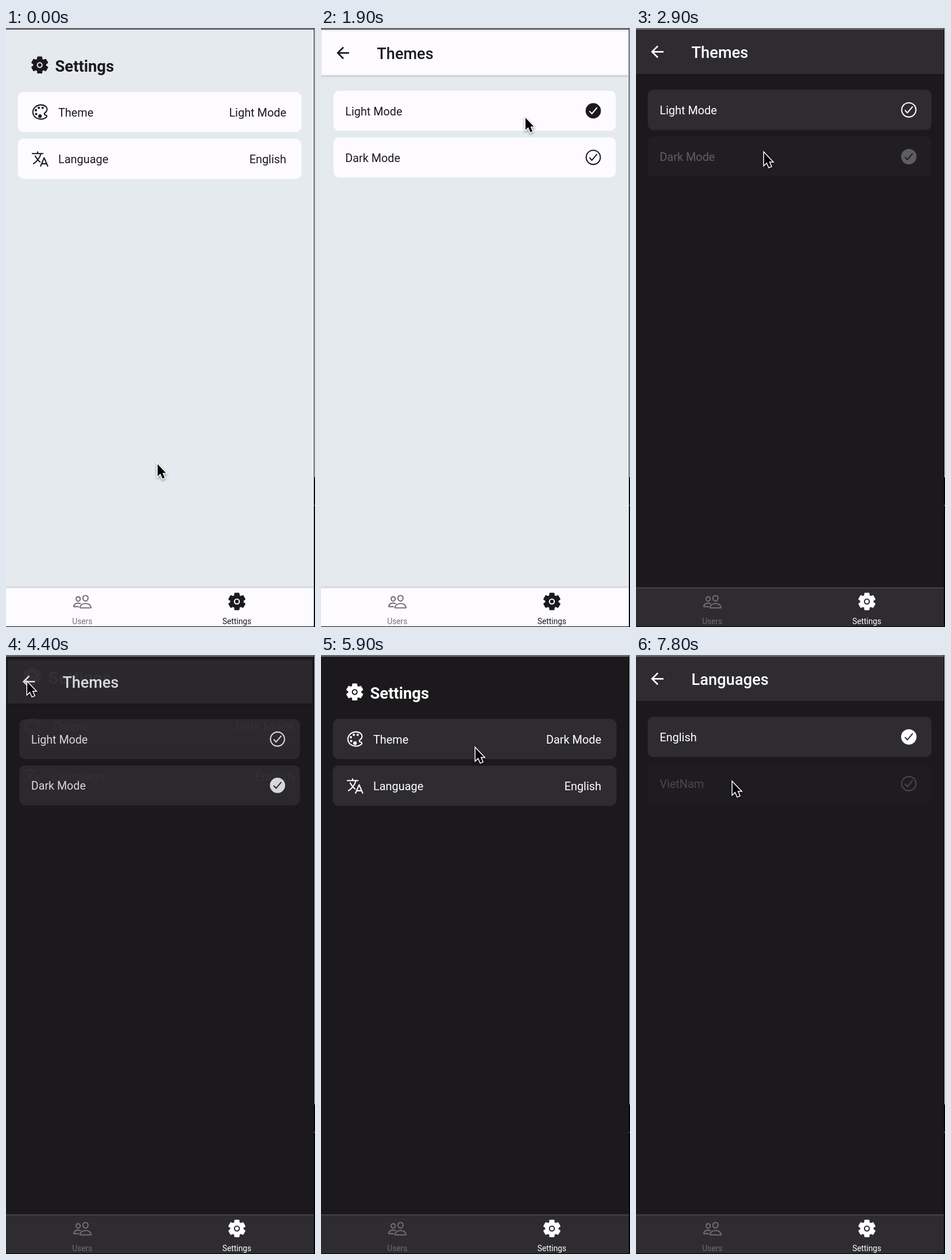
Recreate the animation shown at these times as an HTML page with a canvas. Size 538 px wide and 1041 px high, loop 8000 ms.

```html
<!DOCTYPE html>
<html lang="en">
<head>
<meta charset="utf-8">
<title>Settings</title>
<style>
html, body { margin: 0; width: 100%; height: 100%; overflow: hidden; background: #000; }
canvas { display: block; }
</style>
</head>
<body>
<canvas id="stage" width="538" height="1041"></canvas>
<script>
const W = 538, H = 1041, LOOP = 8000, STEP = 100;
const VIEW = { right: 536, top: 3, bottom: 973, cx: 268, cy: 488 };
const LIGHT = { bg: '#e4eaed', card: '#fdfbff', ink: '#1b1a1e', mute: '#757378', strip: '#6b686d', line: '#dfe2e6', edge: '#f4f4f6' };
const DARK = { bg: '#1b191c', card: '#2e2c30', ink: '#ffffff', mute: '#6f6d71', strip: '#69676a', line: '#646267', edge: '#e6e6e6' };
const DARK_FROM = 2900;

// Page changes: opening or closing the page above the settings list
const MOVES = [
  { at: 1660, page: 'themes', open: true },
  { at: 4385, page: 'themes', open: false },
  { at: 6960, page: 'languages', open: true }
];
// Row presses: [pressed, released]
const PRESS = {
  theme: [1500, 1560],
  dark: [2800, 2840],
  language: [6800, 6860],
  viet: [7800, 9000]
};
// Pointer tip: [time, x, y]
const POINTER = [
  [0, 264, 758], [900, 350, 165], [1000, 355, 160], [1100, 355, 160], [1200, 356, 156],
  [1900, 356, 156], [2300, 224, 219], [2400, 223, 217], [3400, 223, 217], [4100, 37, 47],
  [4500, 37, 47], [4900, 170, 252], [5200, 250, 211], [5900, 269, 162], [6100, 271, 152],
  [6200, 271, 152], [6500, 257, 229], [7100, 257, 229], [7600, 168, 221]
];

const PATHS = {
  palette: 'M430.1 347.9c-6.6-6.1-16.3-7.6-24.6-9-11.5-1.9-15.9-4-22.6-10-14.3-12.7-14.3-31.1 0-43.8l30.3-26.9c46.4-41 46.4-108.2 0-149.2-34.2-30.1-80.1-45-127.8-45-55.7 0-113.9 20.3-158.8 60.1-83.5 73.8-83.5 194.7 0 268.5 41.5 36.7 97.5 55 152.9 55.4h1.7c55.4 0 110-17.9 148.8-52.4 14.4-12.7 12-36.6.1-47.7z',
  language: 'M48 112h288M192 64v48M272 448l96-224 96 224M303.5 384h129M281.3 112S257 206 199 277 80 384 80 384M256 336s-35-27-72-75-56-85-56-85',
  people: 'M402 168c-2.9 40.7-33.1 72-66 72s-63.1-31.3-66-72c-3-42.3 26.4-72 66-72s69 30.5 66 72zM336 304c-65.2 0-127.8 32.4-143.5 95.4-2.1 8.3 3.1 16.6 11.7 16.6h263.6c8.6 0 13.8-8.3 11.7-16.6C463.8 335.4 401.2 304 336 304zM200 186c-2.3 32.4-26.7 58-53 58s-50.7-25.6-53-58c-2.4-33.8 21.3-58 53-58s55.4 24.8 53 58zM206 306c-18-8.3-37.9-11.4-59-11.4-52 0-102.1 25.8-114.6 76.2-1.7 6.7 2.5 13.2 9.4 13.2H154',
  check: 'M352 176L217.6 336 160 272',
  back: 'M20 11H7.83l5.59-5.59L12 4l-8 8 8 8 1.41-1.41L7.83 13H20z',
  pointer: 'M0 0V21L4.8 16.6 8.6 25 12.2 23.4 8.6 15.2H14.5Z'
};
for (const name in PATHS) PATHS[name] = new Path2D(PATHS[name]);

const stage = document.getElementById('stage').getContext('2d');
const layers = [0, 1].map(() => {
  const c = document.createElement('canvas');
  c.width = W;
  c.height = H;
  return c.getContext('2d');
});
let g = stage, depth = 0, now = 0, pal = LIGHT;

const mix = (a, b, k) => a + (b - a) * k;
const clamp = v => Math.min(1, Math.max(0, v));
const smooth = k => k * k * (3 - 2 * k);
const quad = k => k < 0.5 ? 2 * k * k : 1 - 2 * (1 - k) ** 2;

// Piecewise linear map through [x, y] points
function ramp(v, points) {
  for (let i = 1; i < points.length; i++) {
    const [x0, y0] = points[i - 1], [x1, y1] = points[i];
    if (v <= x1) return mix(y0, y1, clamp((v - x0) / (x1 - x0)));
  }
  return points[points.length - 1][1];
}

// cubic-bezier(0.208, 0.82, 0.25, 1)
function glide(x) {
  if (x <= 0 || x >= 1) return clamp(x);
  const curve = (a, b, s) => 3 * a * s * (1 - s) ** 2 + 3 * b * s * s * (1 - s) + s ** 3;
  let lo = 0, hi = 1;
  for (let i = 0; i < 24; i++) {
    const mid = (lo + hi) / 2;
    if (curve(0.208, 0.25, mid) < x) lo = mid; else hi = mid;
  }
  return curve(0.82, 1, lo);
}

function rect(x, y, w, h, color) {
  g.fillStyle = color;
  g.fillRect(x, y, w, h);
}

function text(str, x, y, size, color, weight = 400, align = 'left') {
  g.font = `${weight} ${size}px Roboto, sans-serif`;
  g.textAlign = align;
  g.fillStyle = color;
  g.fillText(str, x, y);
}

function dot(x, y, r) {
  g.beginPath();
  g.arc(x, y, r, 0, Math.PI * 2);
}

function shade(y, size, alpha) {
  const grad = g.createLinearGradient(0, y, 0, y + size);
  grad.addColorStop(0, `rgba(0,0,0,${alpha})`);
  grad.addColorStop(1, 'rgba(0,0,0,0)');
  rect(0, Math.min(y, y + size), VIEW.right, Math.abs(size), grad);
}

// Paints on a layer of its own and blends that as one
function group(alpha, paint) {
  if (alpha <= 0) return;
  if (alpha >= 1) return paint();
  const base = g, layer = layers[depth++];
  layer.resetTransform();
  layer.clearRect(0, 0, W, H);
  layer.setTransform(base.getTransform());
  g = layer;
  paint();
  g = base;
  depth--;
  g.save();
  g.resetTransform();
  g.globalAlpha = alpha;
  g.drawImage(layer.canvas, 0, 0);
  g.restore();
}

// Icons live in a 512 unit box
function icon(x, y, size, color, paint) {
  g.save();
  g.translate(x, y);
  g.scale(size / 512, size / 512);
  g.translate(-256, -256);
  g.lineWidth = 32;
  g.lineCap = g.lineJoin = 'round';
  g.fillStyle = g.strokeStyle = color;
  paint();
  g.restore();
}

function gear(x, y, size, color, back) {
  icon(x, y, size, color, () => {
    g.translate(256, 256);
    g.beginPath();
    for (let k = 0; k < 6; k++) {
      const c = Math.cos(k * Math.PI / 3), s = Math.sin(k * Math.PI / 3);
      for (const [px, py] of [[-54, -150], [-49, -210], [49, -210], [54, -150]]) {
        g.lineTo(px * c - py * s, px * s + py * c);
      }
    }
    g.closePath();
    g.lineWidth = 40;
    g.fill();
    g.stroke();
    dot(0, 0, 64);
    g.lineWidth = 32;
    g.strokeStyle = back;
    g.stroke();
  });
}

function palette(x, y) {
  icon(x, y, 33, pal.ink, () => {
    g.stroke(PATHS.palette);
    for (const [cx, cy, r] of [[144, 208, 32], [152, 311, 32], [224, 144, 32], [256, 367, 48], [328, 144, 32]]) {
      dot(cx, cy, r);
      g.fill();
    }
  });
}

function lines(x, y, size, color, path) {
  icon(x, y, size, color, () => g.stroke(path));
}

function tick(x, y, on) {
  icon(x, y, 33, pal.ink, () => {
    dot(256, 256, on ? 208 : 192);
    if (on) {
      g.fill();
      g.strokeStyle = pal.card;
    } else {
      g.stroke();
    }
    g.stroke(PATHS.check);
  });
}

function pressAlpha(key) {
  const span = PRESS[key];
  if (!span || now < span[0]) return 1;
  return mix(0.2, 1, quad(clamp((now - span[1]) / 250)));
}

function row(y, key, paint) {
  group(pressAlpha(key), () => {
    g.beginPath();
    g.roundRect(20.5, y, 494, 70, 10);
    g.fillStyle = pal.card;
    g.fill();
    paint(y + 35);
  });
}

function settingRow(y, key, label, value, paintIcon) {
  row(y, key, mid => {
    paintIcon(mid);
    text(label, 91, mid + 7.8, 19.9, pal.ink);
    text(value, 488, mid + 7.8, 19.9, pal.ink, 400, 'right');
  });
}

function choiceRow(y, key, label, on) {
  row(y, key, mid => {
    text(label, 41.3, mid + 7.8, 19.9, pal.ink);
    tick(475, mid, on);
  });
}

function header(title) {
  rect(0, 3, VIEW.right, 77, pal.card);
  shade(80, 5, 0.14);
  g.save();
  g.translate(37, 41.3);
  g.scale(1.364, 1.364);
  g.translate(-12, -12);
  g.fillStyle = pal.ink;
  g.fill(PATHS.back);
  g.restore();
  text(title, 96.5, 52, 27.3, pal.ink, 500);
}

const PAGES = {
  settings() {
    gear(58.7, 64.3, 33, pal.ink, pal.bg);
    text('Settings', 85.5, 76, 27.4, pal.ink, 700);
    settingRow(111, 'theme', 'Theme', pal === DARK ? 'Dark Mode' : 'Light Mode', mid => palette(59.2, mid));
    settingRow(192.3, 'language', 'Language', 'English', mid => lines(59.2, mid + 0.3, 33, pal.ink, PATHS.language));
  },
  themes() {
    header('Themes');
    choiceRow(107.3, 'light', 'Light Mode', pal === LIGHT);
    choiceRow(188.6, 'dark', 'Dark Mode', pal === DARK);
  },
  languages() {
    header('Languages');
    choiceRow(107.3, 'english', 'English', true);
    choiceRow(188.6, 'viet', 'VietNam', false);
  }
};

function page(name, scale, alpha) {
  group(alpha, () => {
    g.save();
    g.translate(VIEW.cx, VIEW.cy);
    g.scale(scale, scale);
    g.translate(-VIEW.cx, -VIEW.cy);
    rect(0, VIEW.top, VIEW.right, VIEW.bottom - VIEW.top, pal.bg);
    PAGES[name]();
    g.restore();
  });
}

function pages() {
  const move = MOVES.filter(m => now >= m.at).pop();
  const k = move ? glide((now - move.at) / 400) : 0;
  const p = !move ? 0 : move.open ? k : 1 - k;
  if (p < 1) page('settings', mix(1, 1.075, p), ramp(p, [[0.2075, 1], [1, 0]]));
  if (p > 0) page(move.page, mix(move.open ? 0.85 : 0.925, 1, p), ramp(p, [[0.75, 0], [0.875, 1]]));
}

function tabs() {
  if (pal === LIGHT) shade(VIEW.bottom, -4, 0.1);
  rect(0, 973, VIEW.right, 67, pal.card);
  rect(0, 972.5, VIEW.right, 1, pal.line);
  lines(133, 997, 34.5, pal.mute, PATHS.people);
  text('Users', 132.8, 1036, 13.8, pal.mute, 400, 'center');
  gear(402, 996.7, 33.6, pal.ink, pal.card);
  text('Settings', 402, 1036, 13.8, pal.ink, 400, 'center');
}

function frame() {
  rect(0, 0, VIEW.right, 3, pal.strip);
  rect(0, 1040, W, 1, '#000');
  rect(536, 0, 1, H, '#000');
  rect(537, 0, 1, 781, pal.edge);
  rect(537, 781, 1, 260, '#000');
  rect(536, 829, 2, 1, '#8a8a8c');
}

function pointer() {
  let i = 1;
  while (i < POINTER.length - 1 && now > POINTER[i][0]) i++;
  const [t0, x0, y0] = POINTER[i - 1], [t1, x1, y1] = POINTER[i];
  const k = smooth(clamp((now - t0) / (t1 - t0)));
  g.save();
  g.translate(mix(x0, x1, k), mix(y0, y1, k));
  g.lineWidth = 3;
  g.strokeStyle = '#fff';
  g.shadowColor = 'rgba(0,0,0,0.4)';
  g.shadowBlur = 4;
  g.shadowOffsetY = 2;
  g.stroke(PATHS.pointer);
  g.shadowColor = 'transparent';
  g.fillStyle = '#000';
  g.fill(PATHS.pointer);
  g.restore();
}

function draw(time) {
  now = Math.floor(time % LOOP / STEP) * STEP;
  pal = now >= DARK_FROM ? DARK : LIGHT;
  rect(0, 0, W, H, pal.bg);
  g.save();
  g.beginPath();
  g.rect(0, VIEW.top, VIEW.right, VIEW.bottom - VIEW.top);
  g.clip();
  pages();
  g.restore();
  tabs();
  frame();
  pointer();
}

const start = performance.now();
function loop() {
  draw(performance.now() - start);
  requestAnimationFrame(loop);
}
loop();
</script>
</body>
</html>
```
